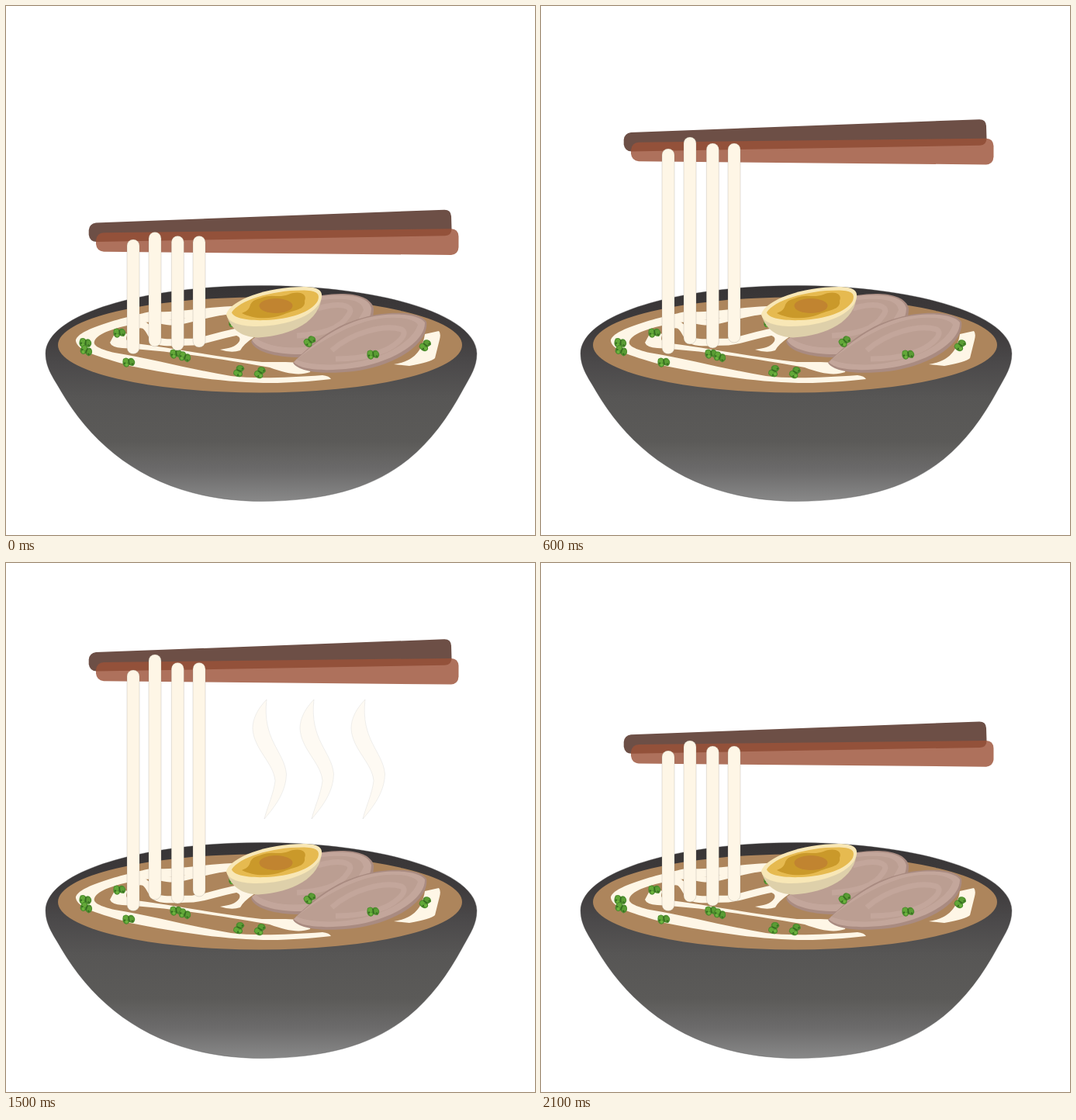
Recreate the animation shown at these times as an HTML page. Size 682 px wide and 682 px high, loop 2.4 s.

```html
<!DOCTYPE html>
<html lang="en">
<head>
<meta charset="utf-8">
<title>Noodle bowl</title>
<style>
  html, body { margin: 0; width: 100%; height: 100%; overflow: hidden; background: #fff; }
  svg { display: block; width: 100vw; height: 100vh; animation: lift 2400ms step-end infinite; }

  /* --lift: sticks, --n1..--n3: strand tops, --dip: strand ends, --rise / --fog: steam */
  @keyframes lift {
    0%, 100%     { --lift: 0px;      --n1: 301px; --n2: 291.5px; --n3: 296.5px; --dip: 0px;  --rise: 0;    --fog: 0; }
    12.5%, 87.5% { --lift: -58.3px;  --n1: 242px; --n2: 229px;   --n3: 236px;   --dip: -2px; --rise: 0;    --fog: 0; }
    25%, 75%     { --lift: -116.5px; --n1: 184px; --n2: 169px;   --n3: 177px;   --dip: -3px; --rise: 0;    --fog: 0; }
    37.5%, 62.5% { --lift: -164.4px; --n1: 138px; --n2: 118px;   --n3: 128.5px; --dip: -5px; --rise: .806; --fog: .45; }
    50%          { --lift: -209.5px; --n1: 102px; --n2: 79px;    --n3: 91px;    --dip: -6px; --rise: 1;    --fog: 1; }
  }

  .sticks { transform: translateY(var(--lift)); }
  .strand { --top: var(--n3); y: var(--top); height: calc(var(--end) - var(--top)); width: 16px; rx: 8px; }
  .strands { fill: #fef6e6; stroke: #8a8478; stroke-width: .25; }
  .s1 { --top: var(--n1); --end: 448.5px; }
  .s2 { --top: var(--n2); --end: calc(439px + var(--dip)); }
  .s3 { --end: calc(444px + var(--dip)); }
  .s4 { --end: calc(440px + 2 * var(--dip)); }
  .steam { transform: translateY(330px) scaleY(var(--rise)) translateY(-330px); opacity: var(--fog);
           fill: #fef6e6; stroke: #777; stroke-width: .3; }
  .cream { fill: #fef6e6; }
  .line { fill: none; stroke: #fef6e6; stroke-linecap: round; stroke-linejoin: round; }
</style>
</head>
<body>
<svg viewBox="0 0 682 682">
  <defs>
    <linearGradient id="glaze" gradientUnits="userSpaceOnUse" x1="0" y1="360" x2="0" y2="639">
      <stop offset="0" stop-color="#373435"/>
      <stop offset=".22" stop-color="#3f3c3d"/>
      <stop offset=".36" stop-color="#4b494a"/>
      <stop offset=".52" stop-color="#575655"/>
      <stop offset=".72" stop-color="#5b5a58"/>
      <stop offset=".86" stop-color="#6c6b6b"/>
      <stop offset="1" stop-color="#898989"/>
    </linearGradient>
    <path id="wisp" d="M336 139C324 154 318 170 318 185C319 218 345 240 347 269C345 290 337 310 333 330C350 306 361 284 361.500 258C359 222 330 204 336 139Z"/>
    <g id="herb">
      <path fill="#4b8b2d" d="M-7 -5Q-3 -8 0 -5Q4 -8 7 -4Q10 0 6 4Q3 4 1 3Q-1 7 -5 5Q-9 2 -7 -5Z"/>
      <circle cx="-3.500" cy="-2.500" r="3" fill="#62a838"/>
      <circle cx="4" cy="-1.500" r="3" fill="#5a9d34"/>
      <circle cx="-2.500" cy="2.500" r="2" fill="#6db43e"/>
      <path d="M0 -4L1 2M-6 1L-4 0M4 1L6 2" fill="none" stroke="#35691f" stroke-width="1.500"/>
    </g>
  </defs>

  <path fill="url(#glaze)" stroke="#555" stroke-width=".4" d="M51 448C52 396 180 360.500 329 360.500S606 396 607 448C607 465 599 477 590 493C540 586 476 638 329 638.500C202 638 121 580 73 500C63 482 51 468 51 448Z"/>
  <ellipse cx="327.500" cy="437" rx="260.500" ry="61.500" fill="#ad855c"/>

  <g class="cream">
    <path d="M292 387C250 389 215 396 186 394C150 402 90 417 90 432C92 445 120 452 160 464C220 476 290 487 350 486C380 485 400 483 419 481Q417 477 408 476C365 479 320 481 290 477C240 469 190 455 140 447C115 441 111 436 115 430C122 420 145 414 170 409C200 406 250 400 300 397Z"/>
    <path d="M142 419L134 434Q136 440 150 441C220 445 300 459 340 466C362 474 378 477 392 472L394 462C370 458 350 459 330 459C270 452 210 440 160 434Q152 431 157 423Z"/>
    <path d="M500 462C520 459 536 450 540 423L558 419Q561 422 559 430L553 454Q548 459 520 464Z"/>
    <path d="M276 443Q291 448 302 444Q306 436 321 426L313 414C300 418 286 420 276 425C294 422 304 425 301 432C296 440 288 441 276 443Z"/>
  </g>
  <path class="line" stroke-width="9" d="M165 413C181 405 184 419 190 428C198 437 220 433 241 433C262 431 276 423 310 418"/>
  <path class="line" stroke-width="7" d="M175 404C193 402 199 408 215 408S250 399 285 394"/>

  <!-- meat slices -->
  <path fill="#a98b81" d="M316 432C319 446 350 454 386 453C438 451 475 421 474 390C470 372 440 368 407 373Z"/>
  <path fill="#c3a69b" d="M317 430C322 443 351 450 384 449C433 447 470 420 471 390C468 373 438 370 405 374Z"/>
  <path fill="#bb9e92" d="M321 427C334 438 360 442 384 440C420 438 449 418 461 392C459 377 435 376 407 379Z"/>
  <path fill="none" stroke="#c3a69b" stroke-width="7" d="M402 390C433 381 451 387 441 399C430 417 407 423 375 425"/>
  <path fill="#a98b81" d="M370 460C378 473 413 475 448 471C500 465 546 436 542 407C533 393 490 393 460 402C425 411 398 431 370 460Z"/>
  <path fill="#c3a69b" d="M371 459C380 470 414 471 446 467C495 461 541 434 540 408C531 395 490 395 461 403C426 413 399 433 371 459Z"/>
  <path fill="#bb9e92" d="M374 456C395 464 427 464 451 459C492 452 524 432 531 411C524 400 490 399 463 407C430 417 401 436 374 456Z"/>
  <path fill="none" stroke="#c3a69b" stroke-width="7" d="M420 444C446 421 487 410 510 417C521 423 500 441 480 447C461 454 441 455 425 455"/>

  <use href="#herb" transform="translate(293 410) scale(.75)"/>

  <!-- egg half -->
  <path fill="#ded0aa" d="M284 397C289 417 304 427 325 427.500C369 425 406 406 407 372Z"/>
  <path fill="#f8e7b6" d="M284 397C290 379 336 362 384 362C401 362 408 366 407 375C404 394 376 408 340 412C311 415 286 411 284 397Z"/>
  <path fill="#e6ba50" d="M291 395C300 380 342 366 385 366.500C402 367 405 372 402 380C394 395 365 404 335 405C310 406 293 402 291 395Z"/>
  <path fill="#ca992a" d="M304 396C321 390 308 382 327 377C342 370 350 377 364 372C379 366 389 372 385 380C387 392 370 392 357 398C338 405 318 403 304 396Z"/>
  <ellipse cx="348" cy="386.500" rx="21.500" ry="9.500" fill="#c18430"/>

  <g id="herbs"></g>

  <g class="sticks">
    <path fill="#6d4f46" d="M116 279.500L565 262.700Q573.500 262.500 574 271L574.500 287Q574.500 296 566 296.200L117 304Q108 304 106.700 295V289Q107.500 280.500 116 279.500Z"/>
    <path fill="#9c5238" fill-opacity=".815" d="M126 292.300L574 287.300Q583 287.500 583.500 297V311Q583 320 574 321L126 316.700Q117 316 116 307V302Q117 293 126 292.300Z"/>
  </g>
  <g class="strands">
    <rect class="strand s1" x="156"/>
    <rect class="strand s2" x="184"/>
    <rect class="strand s3" x="213.300"/>
    <rect class="strand s4" x="241"/>
  </g>
  <g class="steam">
    <use href="#wisp"/>
    <use href="#wisp" x="61"/>
    <use href="#wisp" x="127"/>
  </g>
</svg>
<script>
  // x, y, turn in degrees
  const spots = [
    [102, 435, 10], [103, 445, 30], [146, 422, 0], [158, 460, 0], [219, 449, 0], [230, 453, 25],
    [301, 471, -60], [328, 473, -50], [392, 433, -35], [473, 450, 0], [541, 438, -45]
  ];
  document.getElementById("herbs").innerHTML = spots.map(([x, y, turn]) =>
    `<use href="#herb" transform="translate(${x} ${y}) rotate(${turn})"/>`).join("");
</script>
</body>
</html>
```
